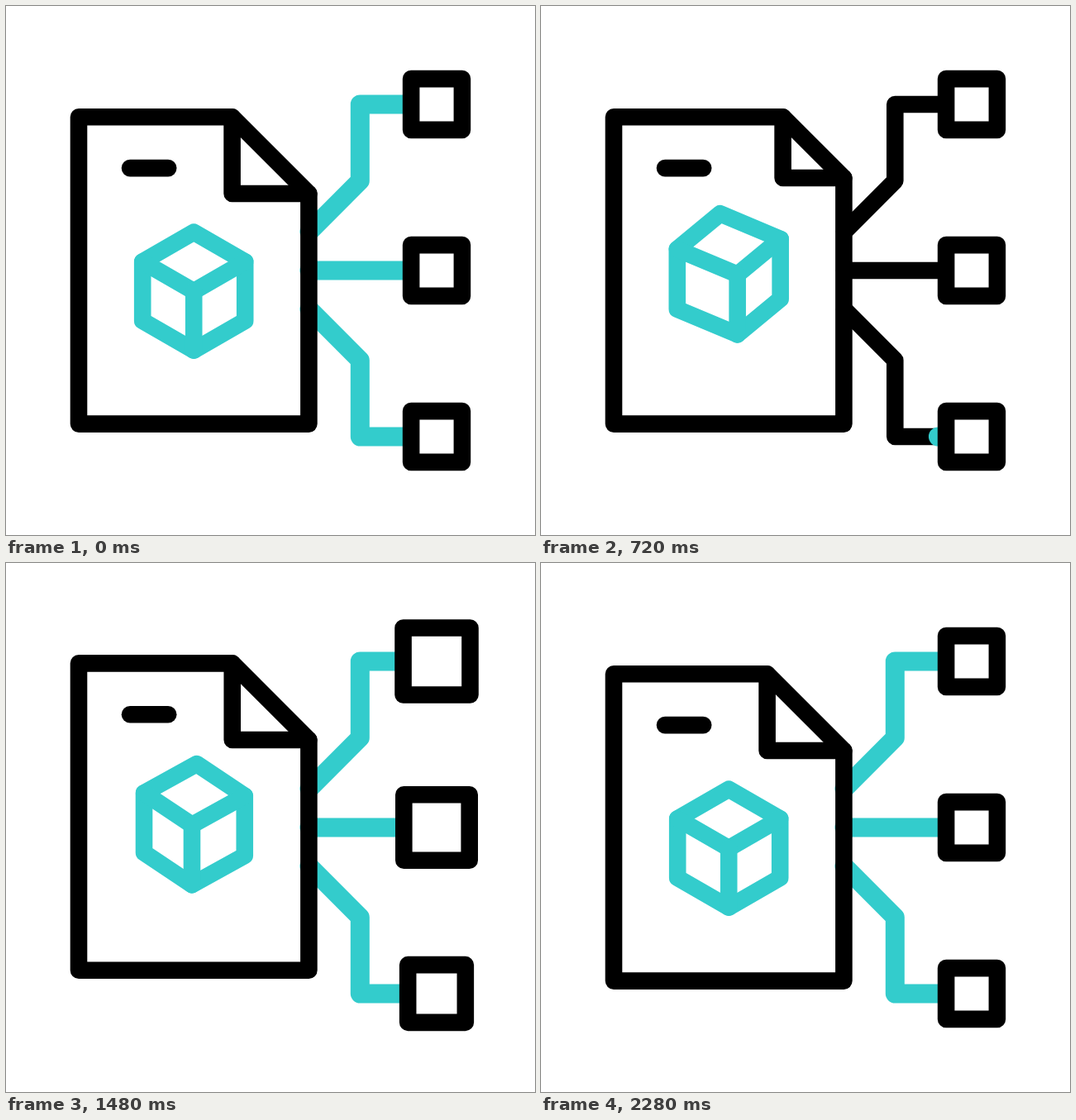
Recreate the animation shown at these times as an HTML page with a canvas. Size 640 by 640 pixels, loop 2360 ms.

```html
<!DOCTYPE html>
<html lang="en">
<head>
<meta charset="utf-8">
<title>File network</title>
<style>
  html, body { margin: 0; width: 100%; height: 100%; overflow: hidden; background: #fff; }
  canvas { display: block; width: 640px; height: 640px; }
</style>
</head>
<body>
<canvas id="stage" width="640" height="640"></canvas>
<script>
const ctx = document.getElementById('stage').getContext('2d');
const LOOP = 2360, STEP = 40;
const BLACK = '#000', TEAL = '#33cccc';
const THIN = 20.6, WIDE = 23;

// Each branch: its route, when it empties and refills, and how its node pulses.
const branches = [
  { route: [[367, 273], [428.3, 211.5], [428.3, 119], [490, 119]],
    length: 241, empty: 36, fill: 738, y: 119, peak: 1525, grow: 9.8 },
  { route: [[367, 320], [490, 320]],
    length: 123, empty: 178, fill: 860, y: 320, peak: 1652, grow: 12.5 },
  { route: [[367, 367], [428.3, 428.5], [428.3, 521], [490, 521]],
    length: 241, empty: 275, fill: 975, y: 521, peak: 1775, grow: 12.9 }
];
const TRIM = 510, PULSE = 940;

const clamp = x => Math.min(1, Math.max(0, x));
const ease = (t, from, to) => 0.5 - 0.5 * Math.cos(Math.PI * clamp((t - from) / (to - from)));
const bump = (t, from, top, to) => t < top ? ease(t, from, top) : 1 - ease(t, top, to);

function trace(points, closed) {
  ctx.beginPath();
  points.forEach(([x, y]) => ctx.lineTo(x, y));
  if (closed) ctx.closePath();
}

function line(points, color, width = THIN, closed = false) {
  trace(points, closed);
  ctx.strokeStyle = color;
  ctx.lineWidth = width;
  ctx.stroke();
}

function trimmed(points, length, from, to) {
  if (to - from < 0.002) return;
  if (from > 0 || to < 1) {
    ctx.setLineDash([length * (to - from), 2000]);
    ctx.lineDashOffset = -length * from;
  }
  line(points, TEAL, WIDE);
  ctx.setLineDash([]);
  ctx.lineDashOffset = 0;
}

function drawBranch(b, t) {
  line(b.route, BLACK);
  trimmed(b.route, b.length, ease(t, b.empty, b.empty + TRIM), 1);
  trimmed(b.route, b.length, 0, ease(t, b.fill, b.fill + TRIM));
}

function drawNode(b, t) {
  const r = 30.9 + b.grow * bump(t, b.peak - PULSE / 2, b.peak, b.peak + PULSE / 2);
  const x = 521;
  const square = [[x - r, b.y - r], [x + r, b.y - r], [x + r, b.y + r], [x - r, b.y + r]];
  trace(square, true);
  ctx.fillStyle = '#fff';
  ctx.fill();
  line(square, BLACK, THIN, true);
}

function drawFile(t) {
  const fold = 92.8 - 19.6 * bump(t, 80, 800, 1520);
  const left = 88, right = 366.4, top = 134.2, bottom = 505.6;
  const foldX = right - fold, foldY = top + fold;
  line([[left, top], [foldX, top], [right, foldY], [right, bottom], [left, bottom]], BLACK, THIN, true);
  line([[foldX, top], [foldX, foldY], [right, foldY]], BLACK);
  line([[150, 196.1], [196.2, 196.1]], BLACK);
}

// Quarter turn, slow at both ends and quick in the middle.
function turn(t) {
  const x = (t - 80) / 920;
  const half = v => 0.5 * (0.2 * v ** 2 + 0.8 * v ** 5.37);
  const u = x < 1 ? half(clamp(x)) : 1 - half(clamp(2 - x));
  return u * Math.PI / 2;
}

function drawCube(t) {
  const lift = bump(t, 180, 1050, 1944);
  const angle = turn(t);
  const rx = 62 + 2 * lift * Math.cos(2 * angle);
  const ry = 35.8 + 2.2 * lift;
  const height = 71.5 + 1.5 * lift;
  const cx = 227.2 + 1.3 * lift * Math.sin(angle) ** 2;
  const cy = 309.4 - 31.2 * lift;
  const facing = angle > Math.PI / 4 ? angle - Math.PI / 2 : angle;
  const corner = k => {
    const a = facing + k * Math.PI / 2;
    return [cx + rx * Math.sin(a), cy + ry * Math.cos(a)];
  };
  const drop = ([x, y]) => [x, y + height];
  const [front, right, back, left] = [0, 1, 2, 3].map(corner);
  line([left, back, right, drop(right), drop(front), drop(left)], TEAL, THIN, true);
  line([left, front, right], TEAL);
  line([front, drop(front)], TEAL);
}

function draw(t) {
  ctx.fillStyle = '#fff';
  ctx.fillRect(0, 0, 640, 640);
  ctx.lineCap = ctx.lineJoin = 'round';
  branches.forEach(b => drawBranch(b, t));
  ctx.save();
  ctx.translate(0, -16.7 * bump(t, 780, 1300, 1865));
  drawFile(t);
  drawCube(t);
  ctx.restore();
  branches.forEach(b => drawNode(b, t));
}

const start = performance.now();
function tick() {
  const t = (performance.now() - start) % LOOP;
  draw(t < 80 ? 0 : Math.floor(t / STEP) * STEP);
  requestAnimationFrame(tick);
}
tick();
</script>
</body>
</html>
```
